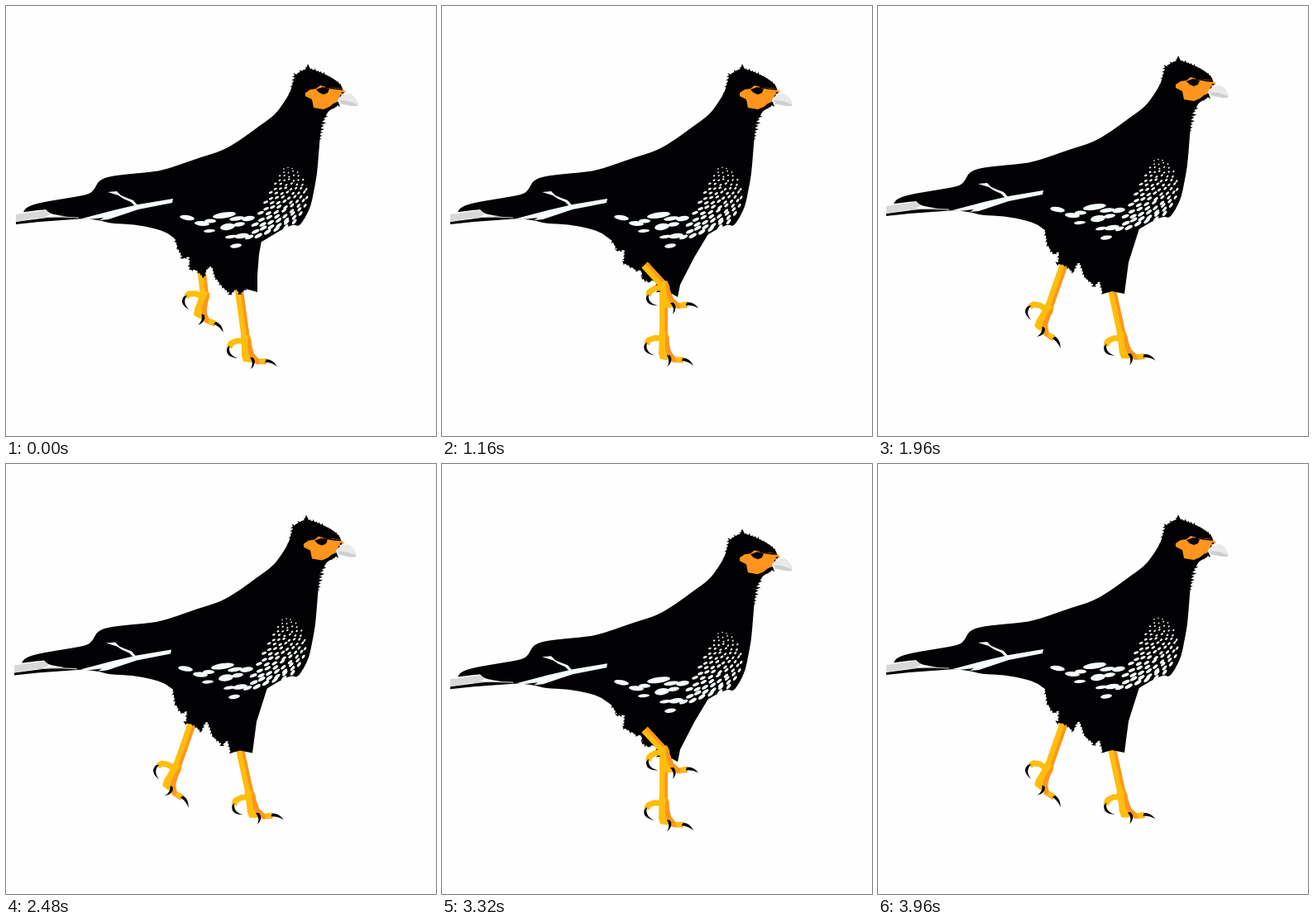
These frames come from a looping animation (520x520 px, 4000 ms). An HTML page with a canvas:

```html
<!DOCTYPE html>
<html lang="en">
<head>
<meta charset="utf-8">
<title>Walking bird</title>
<style>
html, body { margin: 0; width: 100%; height: 100%; overflow: hidden; background: #fefefe; }
canvas { display: block; width: 520px; height: 520px; }
</style>
</head>
<body>
<canvas id="stage"></canvas>
<script>
const SIZE = 520, LOOP = 4000, STEP = 40;
const BLACK = '#020204', WHITE = '#f6fbfc', YELLOW = '#ffbd0c', ORANGE = '#ff951c';
const canvas = document.getElementById('stage');
const dpr = window.devicePixelRatio || 1;
canvas.width = canvas.height = SIZE * dpr;
const ctx = canvas.getContext('2d');

// "x,y x,y" to point pairs
const pts = s => s.trim().split(/\s+/).map(p => p.split(',').map(Number));

const BODY = pts(`349,84 356,79 365,75 380,80 395,87 404,94 408,101 404,112 401,122 390,126
  386,135 382,138 380,155 378,180 376,205 372,225 369,241 362,256 354,267 349,264 338,268
  324,276 308,286 280,300 240,296 207,284 195,274 180,269 155,264 127,263 113,259 92,257
  92,257 54,252 48,246 48,246 21,249 21,249 25,243 40,238 70,233 100,228 107,222 112,211
  125,206 150,203 185,200 210,192 235,183 262,175 285,161 305,146 325,132 336,117 345,102`);
const THIGH = {
  A: pts(`204,280 208,293 214,305 222,303 222,319 230,319 239,328 243,317 249,314 253,328
    262,340 272,348 278,342 283,348 290,342 304,346 304,325 306,300 309,284`),
  B: pts(`205,280 215,296 223,295 222,311 230,315 238,320 243,319 245,330 252,334 261,329
    263,346 270,344 280,348 287,352 290,337 307,304 325,274`),
  C: pts(`204,282 207,299 214,310 221,307 220,322 228,323 238,332 242,322 246,320 252,338
    264,348 270,342 274,358 285,355 300,358 305,320 319,276`),
  D: pts(`205,280 210,295 217,306 225,304 225,320 233,323 239,336 247,334 251,339 251,354
    260,351 274,360 278,344 307,309 327,272`)
};
const CROWN = pts('345,106 349,84 365,76 380,80 406,97');
const THROAT = pts('403,119 388,125 379,160');
const FACE = pts(`362,105 368,101 375,100 380,96 387,98 398,99 407,100 411,104 404,108
  403,115 396,118 391,122 384,125 372,123 370,113 362,109`);

// leg: hip x, hip y, ankle x, ankle y, foot tilt in degrees
const POSES = {
  A: { legs: [[236, 316, 240, 350, 22], [281, 338, 290, 403, 0]], thigh: 'A' },
  B1: { legs: [[270, 335, 270, 400, 3]], over: [247, 313, 270, 338, -8], thigh: 'B' },
  B2: { legs: [[254, 322, 270, 338, -8], [270, 335, 270, 400, 3]], thigh: 'B' },
  C: { legs: [[228, 319, 208, 376, 32], [284, 349, 297, 409, -5]], thigh: 'C' },
  D: { legs: [[233, 318, 245, 350, 26], [259, 347, 254, 407, 15]], thigh: 'D' }
};

// rests between strides: start, end
const RESTS = [[0, 160], [480, 600], [1000, 1160], [1520, 1680],
  [2040, 2160], [2520, 2680], [3040, 3200], [3560, 3680]];
const BOB = [[0, 0], [.1, 8], [.22, 12], [.4, 6], [.55, -2], [.67, -6],
  [.78, -10], [.82, -11], [.875, -9], [1, -4]];

function bob(u) {
  const i = Math.max(1, BOB.findIndex(k => k[0] >= u));
  const [a, ya] = BOB[i - 1], [b, yb] = BOB[i];
  return ya + (yb - ya) * (u - a) / (b - a);
}

function stateAt(t) {
  let i = RESTS.length - 1;
  while (RESTS[i][0] > t) i--;
  const end = RESTS[i][1], odd = i % 2;
  if (t < end) return odd ? { pose: 'D', x: 11, y: -4 } : { pose: 'A', x: 0, y: 0 };
  const next = i + 1 < RESTS.length ? RESTS[i + 1][0] : LOOP;
  const u = (t - end) / (next - end);
  return { pose: u > .45 ? 'C' : odd ? 'B2' : 'B1', x: -2, y: bob(u) };
}

function poly(points, color) {
  ctx.fillStyle = color;
  ctx.beginPath();
  points.forEach(p => ctx.lineTo(p[0], p[1]));
  ctx.closePath();
  ctx.fill();
}

function blob(points, color) {
  ctx.fillStyle = color;
  ctx.beginPath();
  const n = points.length;
  for (let i = 0; i <= n; i++) {
    const [x, y] = points[i % n], [nx, ny] = points[(i + 1) % n];
    const mx = (x + nx) / 2, my = (y + ny) / 2;
    if (i) ctx.quadraticCurveTo(x, y, mx, my);
    else ctx.moveTo(mx, my);
  }
  ctx.fill();
}

function stroke(points, width, color) {
  ctx.strokeStyle = color;
  ctx.lineWidth = width;
  ctx.beginPath();
  points.forEach(p => ctx.lineTo(p[0], p[1]));
  ctx.stroke();
}

function oval(x, y, rx, ry, turn, color) {
  ctx.fillStyle = color;
  ctx.beginPath();
  ctx.ellipse(x, y, rx, ry, turn, 0, Math.PI * 2);
  ctx.fill();
}

// small feather spikes on the left-hand side of a path
function fringe(path, gap, len) {
  for (let i = 1; i < path.length; i++) {
    const [ax, ay] = path[i - 1], [bx, by] = path[i];
    const d = Math.hypot(bx - ax, by - ay), ux = (bx - ax) / d, uy = (by - ay) / d;
    for (let s = 0; s < d; s += gap) {
      const x = ax + ux * s, y = ay + uy * s;
      const h = len * (.7 + .3 * Math.sin(s * 2.3 + i));
      poly([[x - uy * 2, y + ux * 2], [x + uy * h, y - ux * h],
        [x + ux * gap - uy * 2, y + uy * gap + ux * 2]], BLACK);
    }
  }
}

function claw(x, y, cx, cy, tx, ty) {
  const d = Math.hypot(tx - x, ty - y), nx = (ty - y) / d * 2, ny = (x - tx) / d * 2;
  ctx.fillStyle = BLACK;
  ctx.beginPath();
  ctx.moveTo(x - nx, y - ny);
  ctx.quadraticCurveTo(cx - nx, cy - ny, tx, ty);
  ctx.quadraticCurveTo(cx + nx, cy + ny, x + nx, y + ny);
  ctx.fill();
}

function leg([hx, hy, ax, ay, tilt]) {
  const d = Math.hypot(ax - hx, ay - hy), nx = (ay - hy) / d, ny = (hx - ax) / d;
  stroke([[hx, hy], [ax, ay]], 10, YELLOW);
  stroke([[hx + nx * 3.2, hy + ny * 3.2], [ax + nx * 3.2, ay + ny * 3.2]], 3.6, ORANGE);
  ctx.save();
  ctx.translate(ax, ay);
  ctx.rotate(tilt * Math.PI / 180);
  stroke([[0, 2], [-11, 2], [-18, 5], [-20, 10]], 7, YELLOW);
  stroke([[2, 2], [7, 19], [14, 27], [25, 27]], 6.5, ORANGE);
  poly(pts('-6,-5 5,-5 7,2 5,15 10,26 5,28 -3,27 -5,20 -5,13'), YELLOW);
  poly(pts('3,-6 6,0 8,12 11,23 7,25 3,17 2,6'), ORANGE);
  stroke([[16, 27], [25, 26]], 6, YELLOW);
  claw(-21, 9, -24, 20, -10, 23);
  claw(7, 22, 12, 29, 6, 36);
  claw(24, 26, 32, 26, 38, 33);
  ctx.restore();
}

const quad = (a, b, c, t) => (1 - t) * (1 - t) * a + 2 * t * (1 - t) * b + t * t * c;

function spots() {
  const big = [[219, 256, 9, 3], [237, 263, 9, 3], [247, 260, 7, 2.5], [246, 272, 7, 2],
    [264, 253, 14, 3.5], [268, 267, 9, 4], [279, 257, 9, 2.5], [278, 290, 7, 2.5],
    [282, 264, 7, 2.5], [293, 257, 8, 3], [272, 279, 7, 2], [285, 278, 9, 3]];
  big.forEach(([x, y, rx, ry], i) => oval(x, y, rx, ry, i < 4 ? .08 * (2 - i) : -.15, WHITE));
  const rows = 15;
  for (let r = 0; r < rows; r++) {
    const v = r / (rows - 1);
    const lx = quad(335, 318, 292, v), ly = quad(197, 225, 281, v);
    const rx = quad(350, 384, 347, v), ry = quad(195, 232, 264, v);
    const n = Math.max(2, Math.round(Math.hypot(rx - lx, ry - ly) / (4.5 + 6 * v)));
    for (let i = 0; i < n; i++) {
      const s = (i + (r % 2 ? .65 : .2)) / n;
      const size = .75 + 4.8 * Math.pow(v, 1.15) * (1 - s * .3);
      const x = lx + (rx - lx) * s, y = ly + (ry - ly) * s + Math.sin(i * 4 + r * 3);
      oval(x, y, size, .6 + size * .29, -.35 - s * .6, WHITE);
    }
  }
}

function tail() {
  poly(pts('12,261 50,256 92,253 95,257 40,261 12,264'), BLACK);
  poly(pts('12,252 48,247 54,251 50,254 40,256 12,261'), '#d8d8da');
  stroke(pts('40,256 60,255 88,256'), 1.2, '#c4c5c8');
  poly(pts('92,257 130,247 160,240 202,233 201,238 160,246 124,258 113,259 118,256 100,258'), WHITE);
  poly(pts('123,225 134,224 139,229 146,232 154,235 160,242 155,241 151,237 142,233 136,229'), WHITE);
}

function head() {
  fringe(CROWN, 4, 3.5);
  poly(pts('362,78 365,70 369,78'), BLACK);
  fringe(THROAT, 4, 3.5);
  poly(FACE, ORANGE);
  poly(pts('375,101 383,98 391,100 389,105 384,107 379,105'), BLACK);
  stroke(pts('386,98 397,100 407,101'), 1.6, BLACK);
  oval(407, 105, 1.5, 1, 0, BLACK);
  blob(pts('401,112 408,107 416,105 423,111 427,120 420,121 405,119 401,116'), '#e9e9eb');
  poly(pts('404,114 414,115 425,119 425,121 418,121 405,118'), '#cfcfd2');
}

function draw(t) {
  const { pose, x, y } = stateAt(t);
  const { legs, over, thigh } = POSES[pose];
  ctx.setTransform(dpr, 0, 0, dpr, 0, 0);
  ctx.fillStyle = '#fefefe';
  ctx.fillRect(0, 0, SIZE, SIZE);
  ctx.translate(x, y);
  ctx.lineJoin = 'round';
  legs.forEach(leg);
  const edge = THIGH[thigh];
  poly([[215, 250], ...edge, [300, 245]], BLACK);
  fringe(edge.slice(0, -4).reverse(), 4, 2.5);
  blob(BODY, BLACK);
  tail();
  spots();
  head();
  if (over) leg(over);
}

function tick() {
  const t = performance.now() % LOOP;
  draw(Math.floor(t / STEP) * STEP);
  requestAnimationFrame(tick);
}
tick();
</script>
</body>
</html>
```
